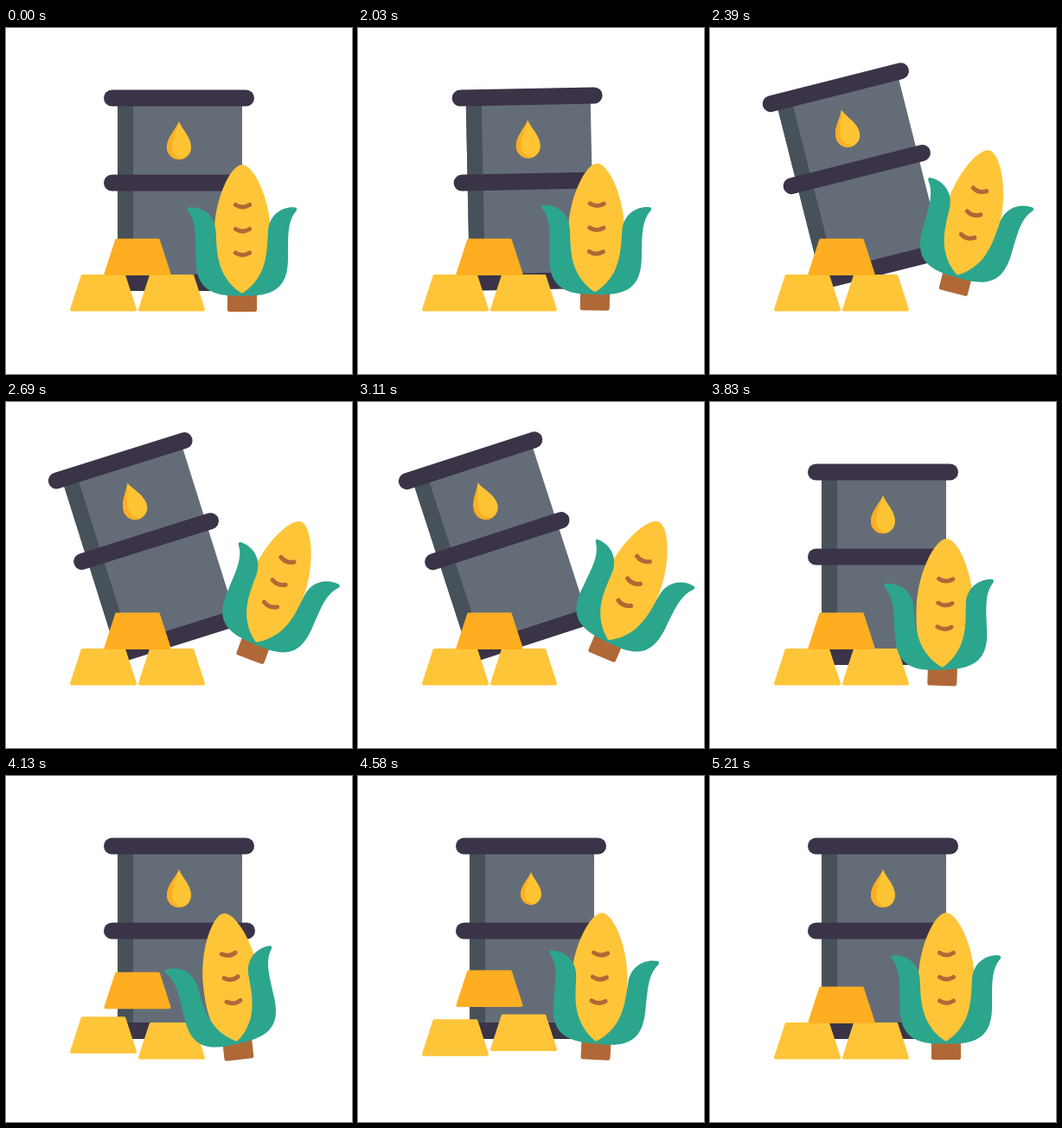
These frames come from a looping animation (400 px wide and 400 px high, 5.27 s). An HTML page:

```html
<!DOCTYPE html>
<html lang="en">
<head>
<meta charset="utf-8">
<title>Commodities</title>
<style>
  html, body { margin: 0; width: 100%; height: 100%; overflow: hidden; background: #fff; }
  svg { display: block; width: 100vw; height: 100vh; }
</style>
</head>
<body>
<svg viewBox="0 0 400 400">
  <defs>
    <path id="ingot" d="M88.500 287H136.500L149 325.500H76Z" stroke-width="4" stroke-linejoin="round"/>
    <path id="grain" d="M265.500 204.500Q273.500 209.500 281.500 204.500" fill="none" stroke="#b06836" stroke-width="5" stroke-linecap="round"/>
    <path id="leaf" d="M211 207.500C226 206 241 216 242.500 234C243.500 252 243.500 266 250 281C255 292 263 301 273 307V309.500C232 311 218.500 298 219.500 262C219 244 221 224 210 211.500Q208 208.500 211 207.500Z"/>
  </defs>

  <g id="barrel">
    <path d="M129 81H273V295H129Z" fill="#646d77"/>
    <path d="M129 81H147V295H129Z" fill="#465159"/>
    <g fill="#3b3347">
      <rect x="113" y="71.500" width="174" height="19" rx="9.500"/>
      <rect x="113" y="169.500" width="175" height="19" rx="9.500"/>
      <rect x="113" y="285" width="175" height="19" rx="9.500"/>
    </g>
    <g id="drop">
      <path d="M200 108C204 118 214 126 214 138A14 14 0 0 1 186 138C186 126 196 118 200 108Z" fill="#ffc434"/>
      <path d="M200 108C198 118 192 126 192 138C192 145 197 150 204 151.400A14 14 0 0 1 186 138C186 126 196 118 200 108Z" fill="#fdae22"/>
    </g>
  </g>

  <g fill="#ffc538" stroke="#ffc538">
    <use id="leftIngot" href="#ingot"/>
    <use id="rightIngot" href="#ingot" x="79"/>
  </g>
  <use id="topIngot" href="#ingot" x="39.500" y="-41.500" fill="#ffae22" stroke="#ffae22"/>

  <g id="corn">
    <g id="cob">
      <rect x="256" y="298" width="34" height="30" rx="2.500" fill="#b06836"/>
      <path d="M273 158C286 158 306 197 306 240C306 282 296 303 273 307C250 303 240.500 282 240.500 240C240.500 197 260 158 273 158Z" fill="#ffc538"/>
      <use href="#grain"/>
      <use href="#grain" y="28"/>
      <use href="#grain" y="55.500"/>
    </g>
    <g id="leaves" fill="#2ca58d">
      <use href="#leaf"/>
      <use href="#leaf" transform="translate(545.500 0) scale(-1 1)"/>
    </g>
  </g>
</svg>
<script>
const LOOP = 5270, STEP = 30;
const PUSH = 2020, FALL = 3170, IMPACT = 3670, RELEASE = 3260;

const progress = (t, from, to) => Math.min(1, Math.max(0, (t - from) / (to - from)));
const mix = (a, b, u) => a + (b - a) * u;
const easeInOut = u => (1 - Math.cos(Math.PI * u)) / 2;

// Decelerating push outwards; a higher power starts faster
const push = (t, power) => 1 - (1 - progress(t, PUSH, 3110)) ** power;

// Push, then accelerating drop back to rest
const lift = (t, power) => push(t, power) * (1 - progress(t, FALL, IMPACT) ** 3);

// Lean out, then a dying swing to the left, right and back to rest
function sway(t, lean) {
  const left = easeInOut(progress(t, RELEASE, 4150));
  const right = easeInOut(progress(t, 4150, 4620));
  const rest = easeInOut(progress(t, 4620, 5180));
  return mix(mix(mix(lean * push(t, 2.3), -1, left), 0.45, right), 0, rest);
}

const hop = (t, from, to) => Math.sin(Math.PI * progress(t, from, to));

function place(id, transform) {
  document.getElementById(id).setAttribute("transform", transform);
}

function draw(time) {
  const t = Math.floor((time + 10) / STEP) * STEP - 10 + 10 * (time >= 0);
  const cornX = 16.5 * lift(t, 3.6) + 5.6 * sway(t, 0);
  const cornY = -31.5 * lift(t, 2.6);

  place("barrel", `rotate(${-18 * lift(t, 3.6)} 123 295)`);
  place("drop", `translate(200 130) scale(${1 - 0.15 * hop(t, 4200, 5100)}) translate(-200 -130)`);
  place("topIngot", `translate(0 ${-27 * hop(t, 3960, 4800)})`);
  place("leftIngot", `translate(0 ${-14.5 * hop(t, 4050, 4640)})`);
  place("rightIngot", `translate(0 ${-14.5 * hop(t, 4140, 4720)})`);
  place("corn", `translate(${cornX} ${cornY})`);
  place("cob", `rotate(${6 * sway(t, 3.83)} 273 307)`);
  place("leaves", `rotate(${13 * sway(t, 2)} 273 307)`);
}

const begin = performance.now();
function tick() {
  draw((performance.now() - begin) % LOOP);
  requestAnimationFrame(tick);
}
tick();
</script>
</body>
</html>
```
